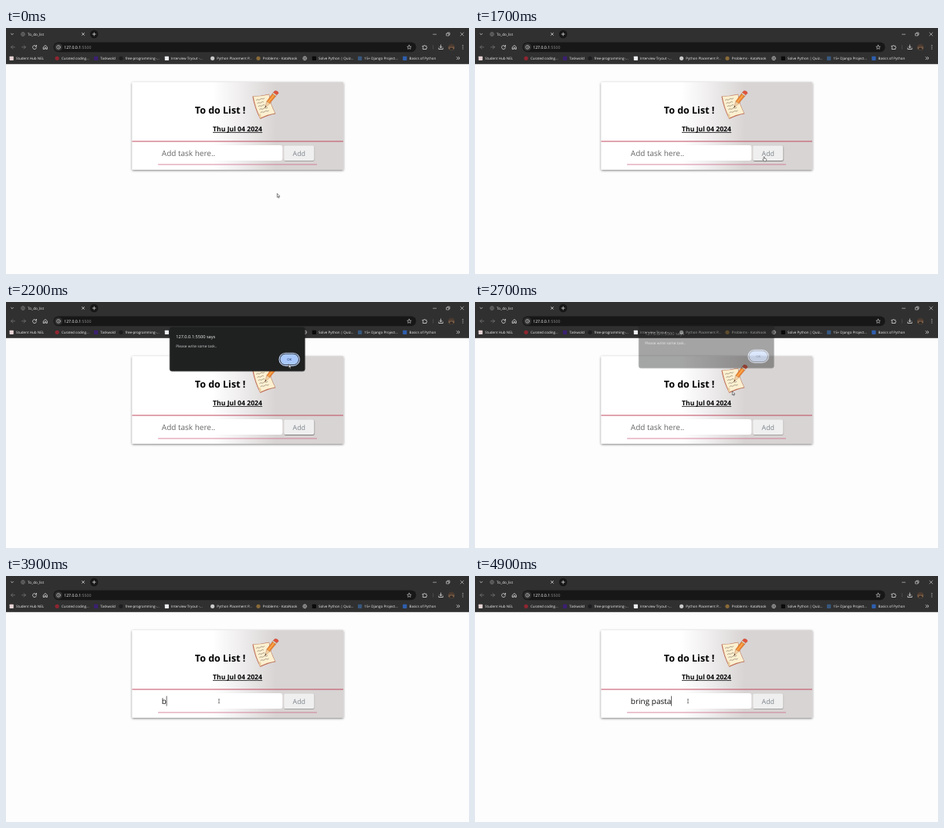
Animation of 600x319 px, one loop 5 s. Source, as an HTML page:

```html
<!DOCTYPE html>
<html lang="en">
<head>
<meta charset="utf-8">
<title>To_do_list</title>
<style>
  html, body { margin: 0; width: 100%; height: 100%; overflow: hidden; background: #fefdfe; }
  svg { display: block; width: 100vw; height: 100vh; }
  text { font-family: "Open Sans", "Noto Sans", sans-serif; white-space: pre; text-rendering: geometricPrecision; }
  .icon { fill: none; stroke: #dcdcdc; stroke-width: .8; stroke-linecap: round; stroke-linejoin: round; }
  .dim { stroke: #777; }
</style>
</head>
<body>
<svg viewBox="0 0 600 319">
  <defs>
    <linearGradient id="cardFill">
      <stop offset=".38" stop-color="#fff"/>
      <stop offset=".5" stop-color="#f1eff0"/>
      <stop offset=".68" stop-color="#d8d4d3"/>
    </linearGradient>
    <linearGradient id="photo" x2="0" y2="1">
      <stop offset=".3" stop-color="#4b3a30"/>
      <stop offset="1" stop-color="#b58a62"/>
    </linearGradient>
    <filter id="cardShadow" x="-10%" y="-10%" width="120%" height="125%">
      <feDropShadow dx="0" dy="1" stdDeviation="1.5" flood-opacity=".55"/>
    </filter>
    <filter id="btnShadow" x="-20%" y="-20%" width="140%" height="150%">
      <feDropShadow dx=".3" dy=".6" stdDeviation=".7" flood-opacity=".42"/>
    </filter>
    <filter id="hoverShadow" x="-20%" y="-20%" width="140%" height="150%">
      <feDropShadow dx=".4" dy=".6" stdDeviation=".6" flood-opacity=".7"/>
    </filter>
  </defs>

  <!-- page -->
  <rect width="600" height="319" fill="#fefdfe"/>
  <rect x="163.5" y="70.2" width="273.7" height="113.6" rx=".8" fill="url(#cardFill)" filter="url(#cardShadow)"/>
  <text x="244.8" y="111.2" font-size="12.5" font-weight="700">To do List !</text>
  <text x="268" y="134" font-size="8.66" font-weight="700">Thu Jul 04 2024</text>
  <path d="M268 135.4H332.2" stroke="#000" stroke-width=".8"/>
  <path d="M163.5 147H437" stroke="#c0485e" stroke-width="1"/>
  <path d="M197 177H403" stroke="#cf6a88" stroke-width=".8"/>

  <!-- note and pencil -->
  <g stroke-linejoin="round" stroke-linecap="round">
    <path d="M319.4 88.8Q330 88.4 341 85.8Q342.6 99 349.4 111.2Q340 113 329.4 118Q322 104 319.4 88.8Z" fill="#c0604c"/>
    <path d="M320.4 88.8Q331 88.4 340.8 86.2Q342.4 99 348.8 110.6Q339 112.2 329.6 116.8Q323 104 320.4 88.8Z" fill="#fbf0d0" stroke="#b08a68" stroke-width=".3"/>
    <path d="M329.6 117.6Q326.6 113.6 328.8 110.6Q332 113.8 329.6 117.6Z" fill="#e9cf9d"/>
    <path id="scrawl" fill="none" stroke="#6b5a50" stroke-width=".55"/>
    <path d="M335.6 103.2L338 94.9L342 97.6Z" fill="#f3cfa0" stroke="#8a4a2c" stroke-width=".3"/>
    <path d="M335.6 103.2L336.3 100.8L337.5 101.6Z" fill="#3a2620"/>
    <path d="M338 94.9L345.4 85L349.8 88.2L342 97.6Z" fill="#ee8430" stroke="#a8481c" stroke-width=".35"/>
    <path d="M340 96.2L347.6 86.6" stroke="#f8b458" stroke-width="1.2"/>
    <path d="M345.4 85L346.5 83.5L350.9 86.7L349.8 88.2Z" fill="#e4dccb" stroke="#8a5a3a" stroke-width=".3"/>
    <path d="M346.5 83.5L348.4 81.5Q352.4 81 353.2 84.4L350.9 86.7Z" fill="#e2533c" stroke="#a8352a" stroke-width=".35"/>
  </g>

  <!-- form -->
  <rect x="197" y="152" width="161.3" height="20" rx="3" fill="#fff"/>
  <text id="field" x="201.8" y="165.7" font-size="10"></text>
  <path id="caret" stroke="#222" stroke-width=".7"/>
  <rect id="addBtn" x="360.2" y="152.4" width="39" height="19.6" rx="2" fill="#efefef"/>
  <text x="379.8" y="165.5" font-size="8.9" text-anchor="middle" fill="#7e858c">Add</text>

  <!-- browser -->
  <rect width="600" height="46.8" fill="#303030"/>
  <text x="28" y="9.8" font-size="4.7" fill="#f0f0f0">To_do_list</text>
  <circle cx="114.2" cy="8" r="5.2" fill="#161616"/>
  <rect x="61.5" y="18.4" width="470" height="12.8" rx="6.4" fill="#171717"/>
  <circle cx="68" cy="24.9" r="5" fill="#303030"/>
  <text x="75.2" y="26.8" font-size="5.2" font-weight="500" fill="#fff">127.0.0.1<tspan fill="#8f8f8f">:5500</tspan></text>
  <g class="icon">
    <path d="M6.6 7.3L8 8.7L9.4 7.3"/>
    <path d="M98.5 6.4L101.5 9.4M101.5 6.4L98.5 9.4"/>
    <path d="M112.2 8H116.2M114.2 6V10"/>
    <path d="M553.5 8.2H557.5M589 6L593 10M593 6L589 10" stroke-width=".6"/>
    <path d="M571 7H574V10H571ZM572 7V6H575V9H574" stroke-width=".6"/>
    <path class="dim" d="M11.4 24.8H6.6M8.8 22.6L6.6 24.8L8.8 27M20.6 24.8H25.4M23.2 22.6L25.4 24.8L23.2 27"/>
    <path d="M39.2 23.7A2.5 2.5 0 1 0 39.5 25.6M39.5 22.3V24H37.8"/>
    <path d="M48.6 24.6L51 22.5L53.4 24.6V27.4H51.8V25.6H50.2V27.4H48.6Z"/>
    <circle cx="68" cy="24.9" r="2.4" stroke-width=".6"/>
    <path d="M68 24.8V26.1M68 23.6V23.7" stroke-width=".6"/>
    <path d="M522.5 22.2L523.3 24L525.2 24.2L523.8 25.5L524.2 27.4L522.5 26.4L520.8 27.4L521.2 25.5L519.8 24.2L521.7 24Z" stroke-width=".6"/>
    <path d="M540.2 23.3H541.8Q542.4 21.2 543.2 23.3H544.8V24.7Q546.6 25.3 544.8 26V27.5H540.2V26Q541.8 25.3 540.2 24.7Z"/>
    <path class="dim" d="M553.4 22.6V27.2" stroke-width=".4"/>
    <path d="M563.5 22V25.6M561.9 24.2L563.5 25.8L565.1 24.2M560.8 26V27.5H566.2V26"/>
    <path d="M584.2 37.6L585.8 39.2L584.2 40.8M586.4 37.6L588 39.2L586.4 40.8"/>
  </g>
  <g id="globes" fill="none"></g>
  <circle cx="577.2" cy="24.8" r="4" fill="url(#photo)"/>
  <path d="M574.3 27.6Q577.2 23.6 580.1 27.6A4 4 0 0 1 574.3 27.6Z" fill="#2c2726"/>
  <g fill="#dcdcdc"><circle cx="592" cy="22.6" r=".6"/><circle cx="592" cy="24.8" r=".6"/><circle cx="592" cy="27" r=".6"/></g>
  <g id="marks"></g>

  <!-- alert -->
  <g id="alert">
    <rect x="211.9" y="32.7" width="175.8" height="57.4" rx="3.4" fill="none" stroke="#000" stroke-opacity=".35" stroke-width=".7"/>
    <rect x="212.2" y="33" width="175.2" height="56.8" rx="3.2" fill="#1f2020"/>
    <text x="220.2" y="47.3" font-size="5.65" font-weight="500" fill="#f0f0f0">127.0.0.1:5500 says</text>
    <text x="220.2" y="58.8" font-size="4.75" fill="#d0d2d4">Please write some task..</text>
    <rect x="354" y="66.2" width="26.4" height="16.4" rx="8.2" fill="none" stroke="#c2d7fb" stroke-width="1.1"/>
    <rect id="okBtn" x="355.4" y="67.6" width="23.6" height="13.6" rx="6.8" fill="#a8c7fa"/>
    <text x="367.2" y="76" font-size="4.3" text-anchor="middle" fill="#16305c">OK</text>
  </g>

  <!-- pointers, hot spot at 0,0 -->
  <g id="pointers">
    <path id="arrow" d="M-.6 -2.4V2.5L.5 1.6L1.3 3.4L2.1 3L1.4 1.3H2.9Z" fill="#fff" stroke="#222" stroke-width=".55"/>
    <path id="beam" d="M-1.1 -2.6Q0 -2.6 0 -2Q0 -2.6 1.1 -2.6M0 -2V2M-1.1 2.6Q0 2.6 0 2Q0 2.6 1.1 2.6" fill="none" stroke="#333" stroke-width=".6"/>
    <path id="hand" d="M-.9 -2.3Q-.3 -2.9 .2 -2.3V-.4L2.3 .2Q2.9 .6 2.6 1.8L2 3.3H-.5L-2.2 1Q-2 .2 -.9 .8Z" fill="#fff" stroke="#222" stroke-width=".55"/>
  </g>
</svg>
<script>
const NS = 'http://www.w3.org/2000/svg';
const $ = id => document.getElementById(id);

function add(parent, tag, attrs, text = '') {
  const el = document.createElementNS(NS, tag);
  for (const k in attrs) el.setAttribute(k, attrs[k]);
  el.textContent = text;
  parent.append(el);
}

// Bookmarks: x of the icon, label, icon colour, round or square
const bookmarks = [
  [4.6, 'Student Hub NEL', '#e6d3d5', 0],
  [63.6, 'Curated coding...', '#8e2530', 1],
  [114, 'Taskwold', '#3b2070', 0],
  [146.4, 'free-programming-...', '#1d1d1f', 1],
  [205.8, 'Interview Tryout -...', '#eceef2', 0],
  [265, 'Python Placement P...', '#c9c9c9', 1],
  [324.4, 'Problems - KataNook', '#8a6a38', 1],
  [396.8, 'Solve Python | Quiz...', '#0a0a0a', 0],
  [456, '15+ Django Project...', '#37587e', 0],
  [514.2, 'Basics of Python', '#2f5fae', 0]
];
for (const [x, label, fill, round] of bookmarks) {
  add($('marks'), 'rect', { x, y: 36.7, width: 5.2, height: 5.2, rx: round ? 2.6 : .6, fill });
  add($('marks'), 'text', { x: x + 8.3, y: 41, 'font-size': 4.55, 'font-weight': 500, fill: '#f2f2f2' }, label);
}
for (const [x, y, stroke] of [[22, 8, '#8c8c8c'], [387.2, 39.3, '#dcdcdc']]) {
  add($('globes'), 'circle', { cx: x, cy: y, r: 2.4, stroke, 'stroke-width': .6 });
  add($('globes'), 'path', { d: `M${x - 2.3} ${y}h4.6M${x} ${y - 2.4}q-2 2.4 0 4.8q2 -2.4 0 -4.8`, stroke, 'stroke-width': .4 });
}

let scrawl = '';
for (let i = 0; i < 5; i++) {
  scrawl += `M${324.4 + i * 1.4} ${93.6 + i * 4}q1.5 -1.4 2.6 -.6t2.6 -.6t2.6 -.6` + (i < 1 || i > 2 ? 't2.6 -.6' : '');
}
$('scrawl').setAttribute('d', scrawl);

// Pointer path: time, x, y, shape
const path = [
  [0, 352, 217, 'arrow'], [600, 352, 217, 'arrow'], [700, 318, 168, 'arrow'],
  [800, 272, 118, 'arrow'], [900, 260, 101, 'beam'], [1000, 288, 106.5, 'beam'],
  [1200, 288, 106.5, 'beam'], [1300, 296, 113, 'arrow'], [1500, 349, 155, 'beam'],
  [1600, 371, 167, 'hand'], [1700, 375, 169.5, 'hand'], [1800, 375, 169.5, 'hand'],
  [1900, 375, 167, 'arrow'], [2000, 373, 143, 'arrow'], [2100, 369, 101, 'arrow'],
  [2200, 367, 83, 'arrow'], [2500, 367, 81.5, 'arrow'], [2600, 361, 89, 'arrow'],
  [2700, 334, 118, 'arrow'], [2800, 310, 139, 'beam'], [2900, 310, 139, 'beam'],
  [3000, 300, 148, 'arrow'], [3200, 277, 161.5, 'beam'], [3300, 276, 162.3, 'beam'], [5000, 276, 162.3, 'beam']
];
// Alert: time, opacity, upward shift
const fade = [
  [0, 0, 6], [1700, 0, 6], [1800, .43, 5.3], [1900, 1, 0], [2500, 1, 0],
  [2600, .85, 1], [2700, .4, 4], [2800, .02, 5.3], [2900, .02, 5.3], [3000, 0, 6], [5000, 0, 6]
];

function sample(keys, t) {
  const i = keys.findLastIndex(k => k[0] <= t);
  const a = keys[i], b = keys[i + 1] || a;
  const p = b === a ? 0 : (t - a[0]) / (b[0] - a[0]);
  return [a[1] + (b[1] - a[1]) * p, a[2] + (b[2] - a[2]) * p, a[3]];
}

const LOOP = 5000, STEP = 100, TYPE_AT = 3900, TYPE_FOR = 1000, task = 'bring pasta';

// Typing gets slightly faster towards the end
function typedAt(t) {
  if (t < TYPE_AT) return '';
  const p = (t - TYPE_AT) / TYPE_FOR;
  return task.slice(0, 1 + Math.floor((task.length - 1) * p ** 1.15));
}

function draw(ms) {
  const t = Math.floor(ms % LOOP / STEP) * STEP;

  const [x, y, shape] = sample(path, t);
  $('pointers').setAttribute('transform', `translate(${x} ${y})`);
  for (const id of ['arrow', 'beam', 'hand']) $(id).setAttribute('display', id === shape ? 'inline' : 'none');

  const [alpha, lift] = sample(fade, t);
  $('alert').setAttribute('opacity', alpha);
  $('alert').setAttribute('transform', `translate(0 ${-lift})`);
  $('okBtn').setAttribute('fill', t === 2500 ? '#bcd3fa' : '#a8c7fa');

  const hover = t >= 1600 && t < 2600;
  $('addBtn').setAttribute('filter', `url(#${hover ? 'hoverShadow' : 'btnShadow'})`);

  const typed = typedAt(t);
  const field = $('field');
  field.textContent = typed || 'Add task here..';
  field.setAttribute('fill', typed ? '#0c0c0c' : '#666');
  const cx = 202 + (typed ? field.getComputedTextLength() : 0);
  $('caret').setAttribute('d', `M${cx} 155.6V168.6`);
  $('caret').setAttribute('display', typed || t >= 3200 && t < 3700 ? 'inline' : 'none');
}

const start = performance.now();
function tick() {
  draw(performance.now() - start);
  requestAnimationFrame(tick);
}
tick();
</script>
</body>
</html>
```
